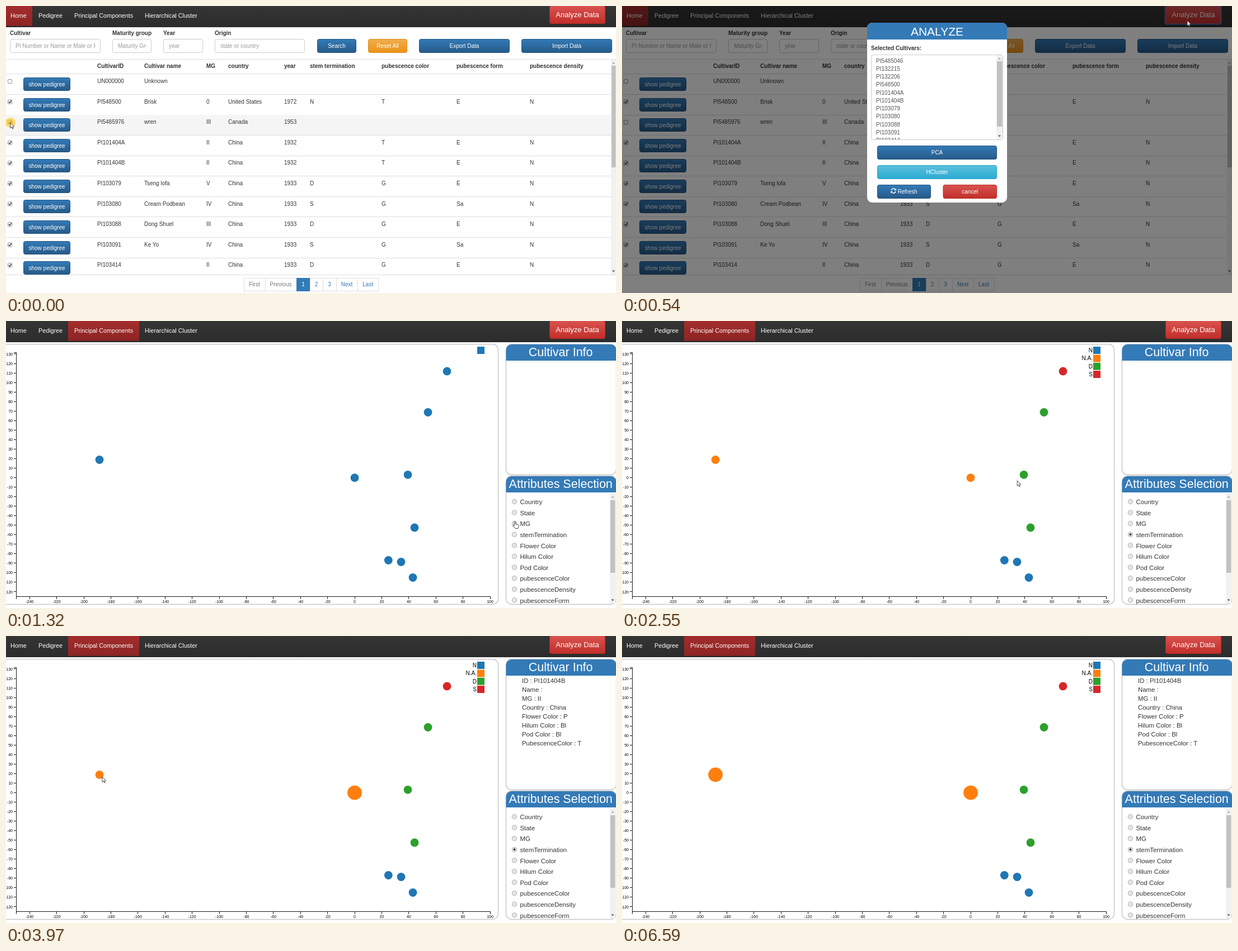
Animation of 1090x514 px, one loop 8370 ms. Source, as an HTML page:

```html
<!DOCTYPE html>
<html lang="en">
<head>
<meta charset="utf-8">
<title>Cultivar analysis</title>
<style>
  html, body { margin: 0; width: 100%; height: 100%; overflow: hidden; background: #fff; }
  svg { display: block; width: 1090px; height: 514px; font-family: Arial, "Liberation Sans", Helvetica, sans-serif; }
  text { white-space: pre; }
</style>
</head>
<body>
<svg id="stage" viewBox="0 0 1090 514" xmlns="http://www.w3.org/2000/svg"></svg>
<script>
const LOOP = 8370;
const PALETTE = ['#1f77b4', '#ff7f0e', '#2ca02c', '#d62728', '#9467bd', '#8c564b'];

// ---- drawing helpers ----
const rect = (x, y, w, h, fill, more = '') =>
  `<rect x="${x}" y="${y}" width="${w}" height="${h}" fill="${fill}" ${more}/>`;
const path = (d, more = '') => `<path d="${d}" ${more}/>`;
// Text is centred on mid, with its baseline on a whole pixel.
const text = (x, mid, s, { size = 10, fill = '#333', bold, anchor = 'start', more = '' } = {}) =>
  `<text x="${x}" y="${Math.round(mid + size * 0.36)}" font-size="${size}" fill="${fill}" ` +
  `text-anchor="${anchor}"${bold ? ' font-weight="700"' : ''} ${more}>${s}</text>`;
const group = (id, body, more = '') => `<g id="${id}" ${more}>${body}</g>`;

const THEMES = {
  primary: ['#337ab7', '#265a88', '#245580'],
  warning: ['#f0ad4e', '#eb9316', '#e38d13'],
  danger: ['#d9534f', '#c12e2a', '#b92c28'],
  info: ['#5bc0de', '#2aabd2', '#28a4c9'],
  tab: ['#a32d2c', '#8d2524', '#8d2524'],
  nav: ['#353535', '#2c2c2c', '#222']
};
const gradients = Object.entries(THEMES).map(([id, [a, b]]) =>
  `<linearGradient id="${id}" x2="0" y2="1"><stop stop-color="${a}"/><stop offset="1" stop-color="${b}"/></linearGradient>`).join('');
const clip = (id, x, y, w, h) => `<clipPath id="${id}">${rect(x, y, w, h, '#000')}</clipPath>`;

const button = (x, y, w, h, label, theme = 'primary', size = 10) =>
  rect(x + .5, y + .5, w - 1, h - 1, `url(#${theme})`, `stroke="${THEMES[theme][2]}" rx="3"`) +
  text(x + w / 2, y + h / 2, label, { size, fill: '#fff', anchor: 'middle' });

function scrollbar(x, y, w, h, top, bottom) {
  const c = x + w / 2, e = y + h;
  return rect(x, y, w, h, '#f1f1f1') + rect(x + 1, top, w - 1.5, bottom - top, '#c1c1c1') +
    path(`M${c - 2.5} ${y + 7.5}h5l-2.5 -3z`, 'fill="#a3a3a3"') +
    path(`M${c - 2.5} ${e - 7.5}h5l-2.5 3z`, 'fill="#505050"');
}

// ---- top bar ----
function navbar(active) {
  const tabs = [['Home', 8, 0, 47], ['Pedigree', 58], ['Principal Components', 122, 111, 127], ['Hierarchical Cluster', 248]];
  return rect(0, 0, 1090, 38, 'url(#nav)') +
    tabs.map(([s, x, left, w], i) =>
      (i === active ? rect(left, 0, w, 35.5, 'url(#tab)') : '') +
      text(x, 17.5, s, { size: 10.75, fill: '#fff' })).join('') +
    button(971, -1, 100, 33, 'Analyze Data', 'danger', 13);
}

// ---- cultivar table ----
const COLS = [163, 247, 358, 397, 497, 543, 671, 805, 936];
const HEADS = ['CultivarID', 'Cultivar name', 'MG', 'country', 'year', 'stem termination',
  'pubescence color', 'pubescence form', 'pubescence density'];
const ROWS = `UN000000|Unknown
PI548500|Brisk|0|United States|1972|N|T|E|N
PI5485976|wren|III|Canada|1953
PI101404A||II|China|1932||T|E|N
PI101404B||II|China|1932||T|E|N
PI103079|Tseng lofa|V|China|1933|D|G|E|N
PI103080|Cream Podbean|IV|China|1933|S|G|Sa|N
PI103088|Dong Shuel|III|China|1933|D|G|E|N
PI103091|Ke Yo|IV|China|1933|S|G|Sa|N
PI103414||II|China|1933|D|G|E|N`.split('\n').map(r => r.split('|'));

function tableRow(cells, i) {
  const dy = i * 36.57, y = 135 + dy;
  const check = path(`M5 ${y}l1.6 1.9 3 -4.2`, `fill="none" stroke="#333" stroke-width="1.4"${i === 2 ? ' id="check"' : ''}`);
  return (i === 2 ? rect(0, 195, 1081, 36, '#f5f5f5', 'id="hover"') : '') +
    rect(0, Math.round(158 + dy), 1081, 1, '#ddd') +
    rect(3.5, y - 3.5, 7, 7, '#fff', 'stroke="#8c8c8c" rx="1"') + (i ? check : '') +
    button(31, Math.round(128 + dy), 84, 24, 'show pedigree') +
    cells.map((s, c) => s && text(COLS[c], 134.5 + dy, s)).join('');
}

function filters() {
  const fields = [['Cultivar', 7, 162, 'PI Number or Name or Male or Female'], ['Maturity group', 190, 70, 'Maturity Group'],
    ['Year', 281, 71, 'year'], ['Origin', 373, 161, 'state or country']];
  return fields.map(([label, x, w, hint], i) =>
    text(x, 48.5, label, { bold: true }) +
    rect(x + .5, 59.5, w - 1, 24, '#fff', 'stroke="#ccc" rx="3"') +
    clip('field' + i, x, 59, w - 9.5, 25) +
    text(x + 10, 71.5, hint, { fill: '#999', more: `clip-path="url(#field${i})"` })).join('') +
    button(556, 59, 70, 25, 'Search') + button(647, 59, 70, 25, 'Reset All', 'warning') +
    button(738, 59, 162, 25, 'Export Data') + button(921, 59, 162, 25, 'Import Data');
}

function pager() {
  const edges = [425, 463, 519, 543, 566, 590, 628, 665];
  return ['First', 'Previous', '1', '2', '3', 'Next', 'Last'].map((s, i) => {
    const x = edges[i], w = edges[i + 1] - x, on = i === 2;
    return rect(x + .5, 487.5, w, 23, on ? '#337ab7' : '#fff', `stroke="${on ? '#337ab7' : '#ddd'}"`) +
      text(x + w / 2, 498.5, s, { anchor: 'middle', fill: on ? '#fff' : i < 2 ? '#777' : '#337ab7' });
  }).join('');
}

const tablePage = () => navbar(0) +
  rect(970.5, -.5, 100, 33, 'none', 'id="focus" rx="3" stroke="#4f7fe0" stroke-width="1.6"') +
  filters() + rect(0, 95, 1090, 1, '#ddd') +
  HEADS.map((s, i) => text(COLS[i], 107.5, s, { bold: true })).join('') +
  rect(0, 121, 1081, 1, '#ddd') +
  group('rows', ROWS.map(tableRow).join(''), 'clip-path="url(#table)"') +
  rect(0, 481, 1090, 1, '#ddd') + scrollbar(1081, 96, 9, 385, 107, 289) + pager();

// ---- analyze dialog ----
function dialog() {
  const ids = ['5485046', '132215', '132206', '548500', '101404A', '101404B', '103079', '103080', '103088', '103091', '103414'];
  const refresh = path('M481.3 330a4 4 0 0 1 7 -1.6M488.9 332a4 4 0 0 1 -7 1.6', 'fill="none" stroke="#fff" stroke-width="1.5"') +
    path('M490 326.5v3.8h-3.8zM480.2 335.5v-3.8h3.8z', 'fill="#fff"');
  return rect(0, 0, 1090, 514, '#000', 'opacity=".5"') +
    rect(438, 30, 250, 322, '#fff', 'rx="9"') +
    path('M438 60V39a9 9 0 0 1 9 -9H679a9 9 0 0 1 9 9V60z', 'fill="#337ab7"') +
    text(563, 45, 'ANALYZE', { size: 21, fill: '#fff', anchor: 'middle' }) +
    text(445, 75.5, 'Selected Cultivars:', { bold: true }) +
    rect(445.5, 87.5, 235, 152, '#fff', 'stroke="#ccc" rx="3"') +
    group('picked', ids.map((s, i) => text(454, 98 + i * 14.27, 'PI' + s, { fill: '#555' })).join(''), 'clip-path="url(#list)"') +
    scrollbar(669, 88, 11, 151, 99, 216) +
    button(456, 250, 214, 25, 'PCA') +
    group('pressed', rect(456.5, 250.5, 213, 24, '#1f4b72', 'stroke="#3f78c8" stroke-width="1.5" rx="3"') +
      text(563, 262.5, 'PCA', { fill: '#fff', anchor: 'middle' })) +
    button(456, 285, 214, 25, 'HCluster', 'info') +
    button(456, 320, 96, 25, '') + refresh + text(492.5, 332, 'Refresh', { fill: '#fff' }) +
    button(573.5, 320, 96.5, 25, 'cancel', 'danger');
}

// ---- scatter page ----
// x, y, group by MG, group by stem termination
const DOTS = [[788, 90, 3, 3], [754, 163.5, 2, 2], [167, 248.5, 1, 1], [623, 280.7, 5, 1], [718, 275.3, 4, 2],
  [730, 370, 1, 2], [683.3, 428.5, 4, 0], [706, 431.5, 4, 0], [727, 459.5, 0, 0]];
const LEGENDS = [[''], ['0', 'II', 'V', 'IV', 'III', 'N.A.'], ['N', 'N.A.', 'D', 'S']];
const RADIOS = ['Country', 'State', 'MG', 'stemTermination', 'Flower Color', 'Hilum Color', 'Pod Color',
  'pubescenceColor', 'pubescenceDensity', 'pubescenceForm'];
const INFO = ['ID', 'Name', 'MG', 'Country', 'Flower Color', 'Hilum Color', 'Pod Color', 'PubescenceColor'];
const DETAILS = [
  ['PI5485046', '', 'N.A.', 'N.A.', 'N.A.', 'N.A.', 'N.A.', 'N.A.'],
  ['PI101404B', '', 'II', 'China', 'P', 'Bl', 'Bl', 'T']
];

function axes() {
  let d = 'M14 56.5H18.5V494M18 493.5H865.5V498M18.5 493V498', labels = '';
  for (let v = -120; v <= 130; v += 10) {
    const y = 280.5 - v * 1.704;
    d += `M14 ${Math.floor(y) + .5}h4`;
    labels += text(12, y, v, { size: 7, fill: '#000', anchor: 'end' });
  }
  for (let v = -240; v <= 100; v += 20) {
    const x = 623 + v * 2.42;
    d += `M${Math.floor(x) + .5} 494v4`;
    labels += text(x, 502.3, v, { size: 7, fill: '#000', anchor: 'middle' });
  }
  return path(d, 'fill="none" stroke="#000" stroke-width=".9"') + labels;
}

const panel = (y, h, title) =>
  rect(893.5, y - .5, 197, h, '#fff', 'rx="10" stroke="#c8c8c8" stroke-width="1.4"') +
  path(`M893.5 ${y + 29}v-19a10 10 0 0 1 10 -10H1080.5a10 10 0 0 1 10 10v19z`, 'fill="#337ab7"') +
  text(991.2, y + 13.5, title, { size: 21.5, fill: '#fff', anchor: 'middle' });

const scatterPage = () => rect(0, 0, 1090, 514, '#fff') + navbar(2) +
  rect(-9.5, 41.5, 889, 466, '#fff', 'rx="10" stroke="#c8c8c8" stroke-width="1.4"') + axes() +
  LEGENDS.map((names, k) => group('legend' + k, names.map((s, i) =>
    rect(842, 46 + i * 14.35, 13, 13, PALETTE[i]) +
    text(841, 52.5 + i * 14.35, s, { fill: '#000', anchor: 'end' })).join(''))).join('') +
  DOTS.map(([x, y], i) => `<circle id="dot${i}" cx="${x}" cy="${y}" r="7.4"/>`).join('') +
  panel(42, 234, 'Cultivar Info') +
  DETAILS.map((vals, k) => group('info' + k, vals.map((v, i) =>
    text(922, 80 + i * 16, `${INFO[i]} : ${v}`, { size: 11.4 })).join(''))).join('') +
  panel(278, 230, 'Attributes Selection') +
  group('radios', RADIOS.map((s, i) => {
    const y = 324 + i * 19.6;
    return `<circle cx="908.5" cy="${y - .5}" r="4.1" fill="#e6e6e6" stroke="#a6a6a6" stroke-width=".9"/>` +
      text(918.5, y, s, { size: 11.4 });
  }).join('') + '<circle id="chosen" cx="908.5" r="2" fill="#444"/>', 'clip-path="url(#attrs)"') +
  scrollbar(1079, 309, 10, 197, 321, 451);

// ---- pointer ----
const pointer = '<circle id="glow" r="9" fill="#ffc61a" opacity=".65"/>' +
  group('cursor',
    path('M0 0V9.6L2.2 7.6 3.7 11 5.1 10.4 3.7 7.1H6.6Z', 'id="arrow" fill="#fff" stroke="#222" stroke-width=".8"') +
    path('M-1.1 1a1.1 1.1 0 0 1 2.2 0v3.8l4.6 1q1.2 .3 1.1 1.5l-.6 3.2-.8 2H.4L-3.4 8q-.6 -1.2 .5 -1.6L-1.1 7.6Z',
      'id="hand" fill="#fff" stroke="#222" stroke-width=".8"'));

const stage = document.getElementById('stage');
stage.innerHTML = `<defs>${gradients}${clip('table', 0, 96, 1081, 385)}${clip('list', 446, 88, 223, 151)}${clip('attrs', 894, 308, 185, 199)}</defs>` +
  group('tablePage', tablePage()) + group('dialog', dialog()) + group('scatterPage', scatterPage()) + pointer;
const el = {};
stage.querySelectorAll('[id]').forEach(n => el[n.id] = n);

// ---- timeline ----
// start, end, steps, target, optional bend
const MOVES = [
  [110, 320, 4, [1010, 26]],
  [880, 1170, 6, [563, 260]],
  [1320, 1320, 1, [909.5, 359]],
  [1420, 1600, 4, [910, 380]],
  [1930, 1930, 1, [907, 383]],
  [2200, 3020, 18, [627, 276], [750, 275]],
  [3070, 3070, 1, [623, 285]],
  [3920, 3970, 2, [172, 252]],
  [4760, 4960, 5, [179, 227]],
  [5800, 6590, 17, [1026, 496]]
];
const CLICKS = [[0, 60], [470, 540], [1220, 1320], [1370, 1420], [1780, 1930], [3370, 3470], [4170, 4320]];

const within = (t, a, b) => t >= a && t < b;
const ramp = (t, a, b, n) =>
  t < a ? 0 : t >= b ? 1 : (Math.floor((t - a) / (b - a) * (n - 1)) + 1) / n;

function pointerAt(t) {
  let p = [8, 209];
  for (const [a, b, n, to, bend] of MOVES) {
    if (t < a) break;
    const u = 1 - (1 - ramp(t, a, b, n)) ** 2, from = p;
    p = from.map((v, i) => {
      const c = bend ? bend[i] : (v + to[i]) / 2;
      return (1 - u) ** 2 * v + 2 * u * (1 - u) * c + u * u * to[i];
    });
  }
  return p;
}

const show = (id, on) => { el[id].style.display = on ? '' : 'none'; };

function render(t) {
  const scatter = t >= 1320;
  show('tablePage', !scatter);
  show('scatterPage', scatter);
  show('hover', t < 110);
  show('check', t < 60);
  show('focus', within(t, 470, 880));
  show('dialog', within(t, 470, 1320));
  el.dialog.style.opacity = ramp(t, 470, 540, 3);
  show('pressed', t >= 1220);

  const mode = t < 1420 ? 0 : t < 1780 ? 1 : 2;
  LEGENDS.forEach((_, k) => show('legend' + k, k === mode));
  DOTS.forEach((d, i) => el['dot' + i].setAttribute('fill', PALETTE[mode ? d[mode + 1] : 0]));
  el.dot3.setAttribute('r', 7.4 + 5.5 * ramp(t, 3660, 3780, 3));
  el.dot2.setAttribute('r', 7.4 + 5.5 * ramp(t, 4320, 4590, 6));
  show('chosen', mode > 0);
  el.chosen.setAttribute('cy', mode === 1 ? 362.7 : 382.3);
  show('info0', within(t, 3070, 3970));
  show('info1', t >= 3970);

  const at = `translate(${pointerAt(t).map(v => v.toFixed(1))})`;
  const hand = within(t, 1170, 1930);
  el.cursor.setAttribute('transform', at);
  el.glow.setAttribute('transform', at);
  show('cursor', t < 6590);
  show('glow', CLICKS.some(([a, b]) => within(t, a, b)));
  show('hand', hand);
  show('arrow', !hand);
}

const start = performance.now();
function tick() {
  render((performance.now() - start) % LOOP);
  requestAnimationFrame(tick);
}
tick();
</script>
</body>
</html>
```
